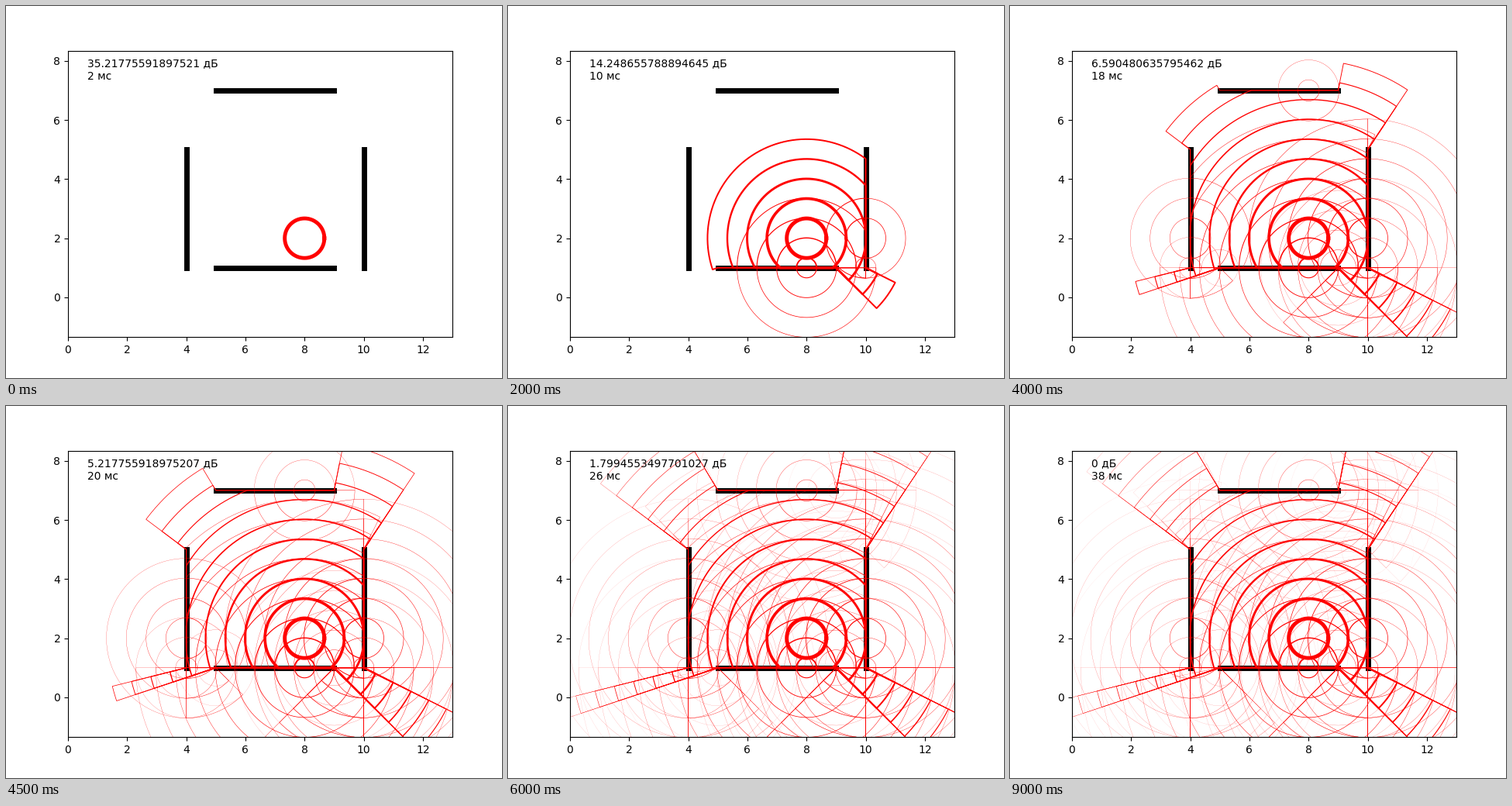
Write a matplotlib script that moves like this. It is 640 px wide and 480 px high and loops after 9.5 s.

```python
import numpy as np
import matplotlib.pyplot as plt
from matplotlib.animation import FuncAnimation

STEPS = 19
SPEED = 335           # m/s
STEP_MS = 2
REFLECT, PASS = 0.5, 0.3
MAX_ORDER = 2
EPS = 1e-6

WALLS = [np.array(w, float) for w in (
    ((5, 1), (9, 1)),
    ((10, 1), (10, 5)),
    ((5, 7), (9, 7)),
    ((4, 1), (4, 5)),
)]
SOURCE = np.array([8.0, 2.0])


def radius(step):
    return SPEED * step * STEP_MS / 1000


def level(step):
    return max(0, 30 - 30 * np.log10(radius(step)))


LAST = max(s for s in range(1, STEPS + 1) if level(s) > 0)


def nearest(wall, p):
    a, b = wall
    u = np.dot(p - a, b - a) / np.dot(b - a, b - a)
    return a + np.clip(u, 0, 1) * (b - a)


def front(center, r, start, span, own):
    """Outline of the area reached from center, cut by the other walls."""
    others = [w for i, w in enumerate(WALLS) if i != own]
    angles = [np.linspace(EPS, span - EPS, int(span * 160))]
    for wall in others:
        for end in wall - center:
            rel = (np.arctan2(end[1], end[0]) - start) % (2 * np.pi)
            angles.append(rel + np.array([-EPS, 0, EPS]))
    rel = np.sort(np.concatenate(angles))
    ang = start + rel[(rel >= EPS) & (rel <= span - EPS)]
    dx, dy = np.cos(ang), np.sin(ang)
    dist = np.full(ang.shape, r)
    for a, b in others:
        ex, ey = b - a
        px, py = a - center
        det = dx * ey - dy * ex
        ok = np.abs(det) > 1e-12
        det = np.where(ok, det, 1)
        t = (px * ey - py * ex) / det
        u = (px * dy - py * dx) / det
        hit = ok & (t > 1e-9) & (u >= -1e-9) & (u <= 1 + 1e-9)
        dist = np.where(hit, np.minimum(dist, t), dist)
    x, y = center[0] + dist * dx, center[1] + dist * dy
    return np.append(x, x[0]), np.append(y, y[0])


def spread(center, travelled, gain, start, span, own, order):
    """Yield this wave and all waves it starts on the walls."""
    yield center, travelled, gain, start, span, own
    if order == MAX_ORDER:
        return
    inward = np.array([np.cos(start + np.pi / 2), np.sin(start + np.pi / 2)])
    for i, wall in enumerate(WALLS):
        p = nearest(wall, center)
        way = p - center
        total = travelled + np.hypot(*way)
        if i == own or total >= radius(LAST):
            continue
        if own is not None and np.dot(way, inward) < -1e-9:
            continue
        ex, ey = wall[1] - wall[0]
        along = np.arctan2(ey, ex)
        # the wave bounces back to the side facing the room
        mid = np.array([7.0, 4.0])
        origin = center if abs(ex * way[1] - ey * way[0]) > 1e-9 else mid
        ox, oy = origin - p
        back = along if ex * oy - ey * ox > 0 else along + np.pi
        yield from spread(p, total, gain * REFLECT, back, np.pi, i, order + 1)
        yield from spread(p, total, gain * PASS, back + np.pi, np.pi, i, order + 1)


fig = plt.figure(figsize=(6.4, 4.8), dpi=100)
ax = fig.add_subplot()
half = 13 * 369.6 / 496 / 2
ax.set_xlim(0, 13)
ax.set_ylim(3.5 - half, 3.5 + half)

for wall in WALLS:
    ax.plot(*wall.T, color="black", lw=5)

waves = list(spread(SOURCE, 0, 1, 0, 2 * np.pi, None, 0))
lines = []
for step in range(1, LAST + 1):
    for center, travelled, gain, start, span, own in waves:
        r = radius(step) - travelled
        if r > 0:
            x, y = front(center, r, start, span, own)
            line, = ax.plot(x, y, color="red", lw=gain * level(step) / 10)
            lines.append((step, line))

label = ax.text(0.05, 0.9, "", transform=ax.transAxes, fontsize=10)


def update(i):
    now = i + 1
    for step, line in lines:
        line.set_visible(step <= now)
    label.set_text(f"{level(now)} дБ\n{now * STEP_MS} мс")
    return [label]


anim = FuncAnimation(fig, update, frames=STEPS, interval=500,
                     repeat=True, repeat_delay=0, blit=False)
plt.show()
```
